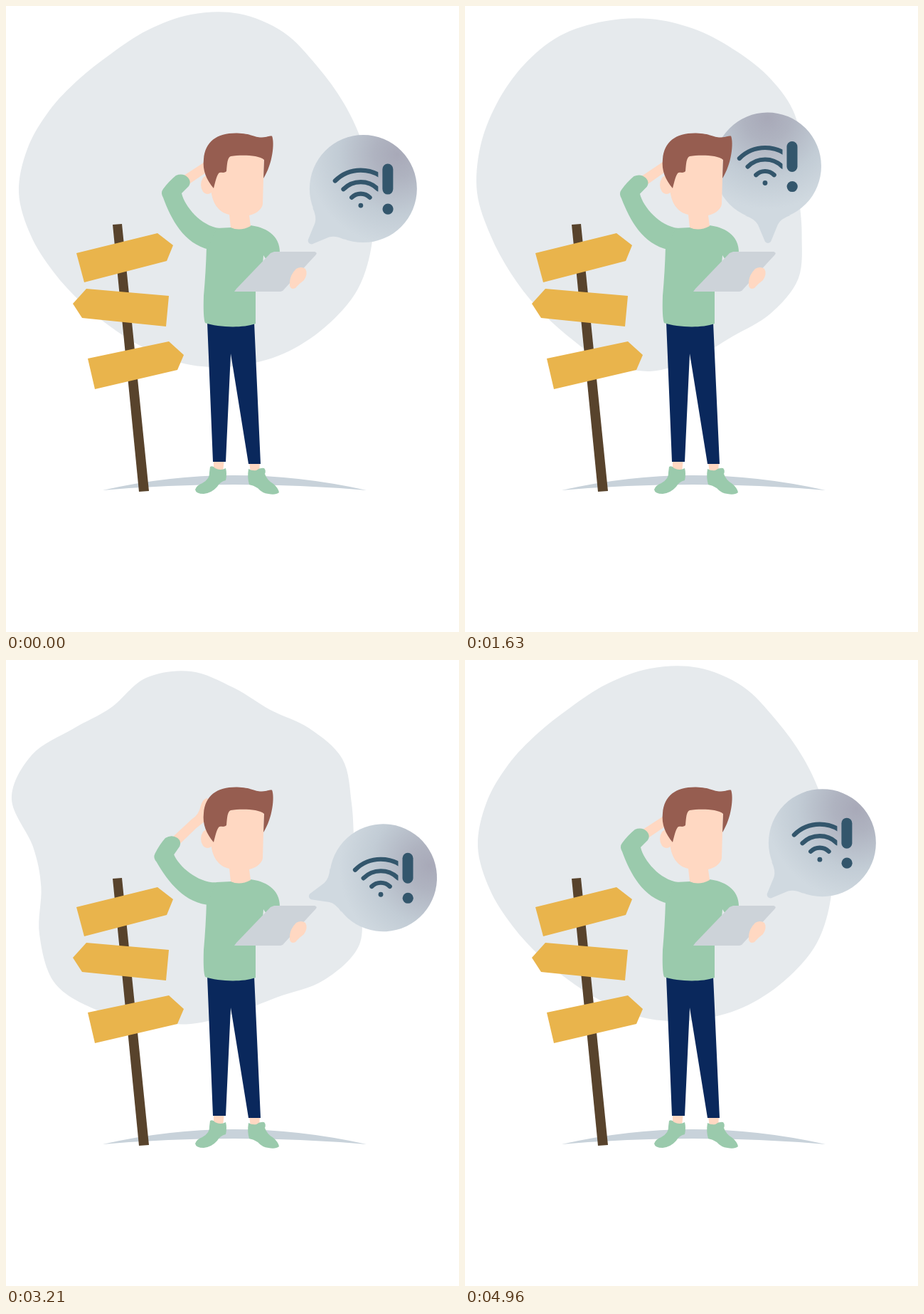
An HTML page with a canvas that plays this animation: 637 by 879 pixels, repeating every 5000 ms.

```html
<!DOCTYPE html>
<html lang="en">
<head>
<meta charset="utf-8">
<title>Lost without a signal</title>
<style>
html, body { margin: 0; width: 100%; height: 100%; overflow: hidden; background: #fff; }
canvas { display: block; width: 637px; height: 879px; }
</style>
</head>
<body>
<canvas id="stage" width="637" height="879"></canvas>
<script>
const ctx = document.getElementById('stage').getContext('2d');
const LOOP = 5;
const GREEN = '#9acaac', SKIN = '#ffd8c2', HAIR = '#965d50', NAVY = '#0a285c';
const INK = '#33566c', SIGN = '#e9b44c', WOOD = '#58432c';

// Blob radii every 15 degrees, clockwise from the right
const BLOBS = [
  [254, 264, 271, 267, 261, 252, 242, 229, 220, 218, 223, 233,
   242, 238, 230, 224, 225, 236, 250, 260, 260, 251, 249, 251],
  [210, 221, 241, 240, 233, 241, 251, 245, 232, 226, 226, 232,
   243, 247, 249, 252, 254, 249, 244, 238, 233, 233, 232, 222],
  [230, 245, 274, 265, 244, 242, 249, 253, 265, 271, 246, 218,
   222, 261, 258, 234, 225, 245, 246, 231, 222, 235, 246, 234]
];
const TURNS = [45, -0.4, 75.6];
const KEYS = [0, 1.75, 3.32, 5];
const ARM = [0, -9.5, 0, -9.5, -11, 0];

// cubic-bezier(.25, .1, .25, 1)
function ease(x) {
  let lo = 0, hi = 1, s = x;
  for (let i = 0; i < 24; i++) {
    s = (lo + hi) / 2;
    const u = 1 - s;
    if (0.75 * u * u * s + 0.75 * u * s * s + s * s * s < x) lo = s; else hi = s;
  }
  const u = 1 - s;
  return 0.3 * u * u * s + 3 * u * s * s + s * s * s;
}

const mix = (a, b, p) => a + (b - a) * p;
const rad = d => d * Math.PI / 180;

function fill(d, color) {
  ctx.fillStyle = color;
  ctx.fill(new Path2D(d));
}

function disc(x, y, r) {
  ctx.beginPath();
  ctx.arc(x, y, r, 0, Math.PI * 2);
  ctx.fill();
}

function blob(from, to, p, dip) {
  const pts = BLOBS[from].map((r, i) => {
    const a = rad(i * 15);
    const pull = dip * p * (1 - p) * Math.pow(Math.max(0, Math.sin(a)), 8);
    const d = mix(r, BLOBS[to][i], p) - pull;
    return [260 + d * Math.cos(a), 262 + d * Math.sin(a)];
  });
  const n = pts.length, at = i => pts[(i + n) % n];
  ctx.beginPath();
  ctx.moveTo(...pts[0]);
  for (let i = 0; i < n; i++) {
    const [a, b, c, d] = [at(i - 1), at(i), at(i + 1), at(i + 2)];
    ctx.bezierCurveTo(b[0] + (c[0] - a[0]) / 6, b[1] + (c[1] - a[1]) / 6,
      c[0] - (d[0] - b[0]) / 6, c[1] - (d[1] - b[1]) / 6, c[0], c[1]);
  }
  ctx.fillStyle = '#e6eaed';
  ctx.fill();
}

function icon(x, y) {
  ctx.save();
  ctx.translate(x, y);
  ctx.fillStyle = ctx.strokeStyle = INK;
  ctx.beginPath();
  ctx.roundRect(27, -35, 15, 43, 7.5);
  ctx.fill();
  disc(34.7, 28.5, 7.6);
  disc(-3.5, 23.5, 3.4);
  ctx.beginPath();
  ctx.rect(-60, -60, 81, 120);
  ctx.clip();
  ctx.lineWidth = 6.2;
  ctx.lineCap = 'round';
  for (const r of [18, 34.5, 51]) {
    ctx.beginPath();
    ctx.arc(-3.5, 25, r, rad(-135), rad(-45));
    ctx.stroke();
  }
  ctx.restore();
}

// The bubble swings around the tip of its tail; the icon stays upright
function bubble(turn) {
  const a = rad(turn);
  ctx.save();
  ctx.translate(426, 333);
  ctx.rotate(a);
  const g = ctx.createRadialGradient(0, -176, 0, 0, -176, 128);
  g.addColorStop(0, '#a8a9b8');
  g.addColorStop(0.25, '#afb3c0');
  g.addColorStop(0.65, '#c2ccd5');
  g.addColorStop(1, '#d0d9e0');
  ctx.fillStyle = g;
  disc(0, -108, 75.5);
  fill('M-32 -39 Q-18 -34 -14 -26 L-4 -2 Q0 2 4 -2 L14 -26 Q18 -34 32 -39 Z', g);
  ctx.restore();
  icon(426 + 108 * Math.sin(a), 333 - 108 * Math.cos(a));
}

function signpost() {
  fill('M150 307 L163 306 L201 681 L187 682 Z', WOOD);
  fill('M99 347 L213 319 L235 336 L226 358 L110 388 Z', SIGN);
  fill('M113 397 L229 407 L225 450 L107 438 L94 418 Z', SIGN);
  fill('M115 495 L229 471 L250 490 L241 511 L125 538 Z', SIGN);
}

function raisedArm(turn) {
  ctx.save();
  ctx.translate(300, 330);
  ctx.rotate(rad(turn));
  ctx.translate(-300, -330);
  fill('M247 240 L281 218 Q291 214 296 202 Q300 194 306 193 L318 200 L315 215 L284 232 L256 251 Z', SKIN);
  fill('M300 312 C274 309 251 281 247 263 L257 253 Q261 247 256 241 Q249 234 239 238 ' +
    'Q229 246 221 257 Q217 262 221 269 C232 299 250 334 286 342 L304 340 Z', GREEN);
  ctx.restore();
}

function legs() {
  fill('M292 636 H307 L305 654 H292 Z', SKIN);
  fill('M342 640 H357 L356 656 H344 Z', SKIN);
  fill('M283 444 H349 L358 643 H341 L316 488 L309 640 H291 Z', NAVY);
  fill('M287 647 Q291 645 294 649 Q302 653 309 649 Q311 657 309 666 Q301 668 297 675 ' +
    'Q289 684 278 685 Q267 685 266 679 Q268 673 276 670 Q287 664 286 655 Z', GREEN);
  fill('M341 650 Q346 653 352 652 Q357 648 363 649 Q366 652 364 657 Q367 666 376 671 ' +
    'Q383 677 384 683 Q379 687 369 685 Q360 684 354 677 Q348 673 342 672 Q339 662 341 650 Z', GREEN);
}

function torso() {
  fill('M284 339 L296 312 L317 311 Q329 316 343 308 C363 310 386 321 385 347 L372 365 ' +
    'L362 350 L361 362 L351 392 V446 C331 453 298 451 280 445 Q277 438 278 407 Q281 374 282 338 Z', GREEN);
}

function head() {
  ctx.fillStyle = SKIN;
  ctx.beginPath();
  ctx.ellipse(283.5, 251, 9.5, 13, 0, 0, Math.PI * 2);
  ctx.fill();
  fill('M300 205 H363 L361 278 C360 286 351 292 342 294 L344 309 Q329 317 316 311 L314 293 ' +
    'C299 290 288 276 288 252 Z', SKIN);
  fill('M278 215 C280 190 297 178 325 178.5 C345 179 350 185 360 184.5 C368 184 370 182 374 182.5 ' +
    'C378 192 375 222 362 242 L363 216 C355 209 330 209 316 211 C311 213 311 222 310 232 ' +
    'C306 236 302 232 299 235 C296 239 294 248 292 256 C282 244 276 231 278 215 Z', HAIR);
}

function tablet() {
  fill('M377 345 H434 Q438 346 436 349 L389 400 L386 401 H321 L324 397 L372 347 Z', '#cdd3d9');
  fill('M399 387 Q400 377 408 369 Q415 365 421 369 Q425 376 419 385 Q412 390 407 396 Q401 399 399 393 Z', SKIN);
}

function draw(t) {
  ctx.fillStyle = '#fff';
  ctx.fillRect(0, 0, 637, 879);

  const k = t < KEYS[1] ? 0 : t < KEYS[2] ? 1 : 2, next = (k + 1) % 3;
  const p = ease((t - KEYS[k]) / (KEYS[k + 1] - KEYS[k]));
  const s = Math.min(4, Math.floor(t));

  blob(k, next, p, k === 1 ? 30 : 0);
  bubble(mix(TURNS[k], TURNS[next], p));
  fill('M136 680 Q320 638 507 680 Q320 664 136 680 Z', '#c8d2da');
  signpost();
  legs();
  raisedArm(mix(ARM[s], ARM[s + 1], ease(t - s)));
  torso();
  head();
  tablet();
}

const start = performance.now();
function tick() {
  draw((performance.now() - start) / 1000 % LOOP);
  requestAnimationFrame(tick);
}
tick();
</script>
</body>
</html>
```
